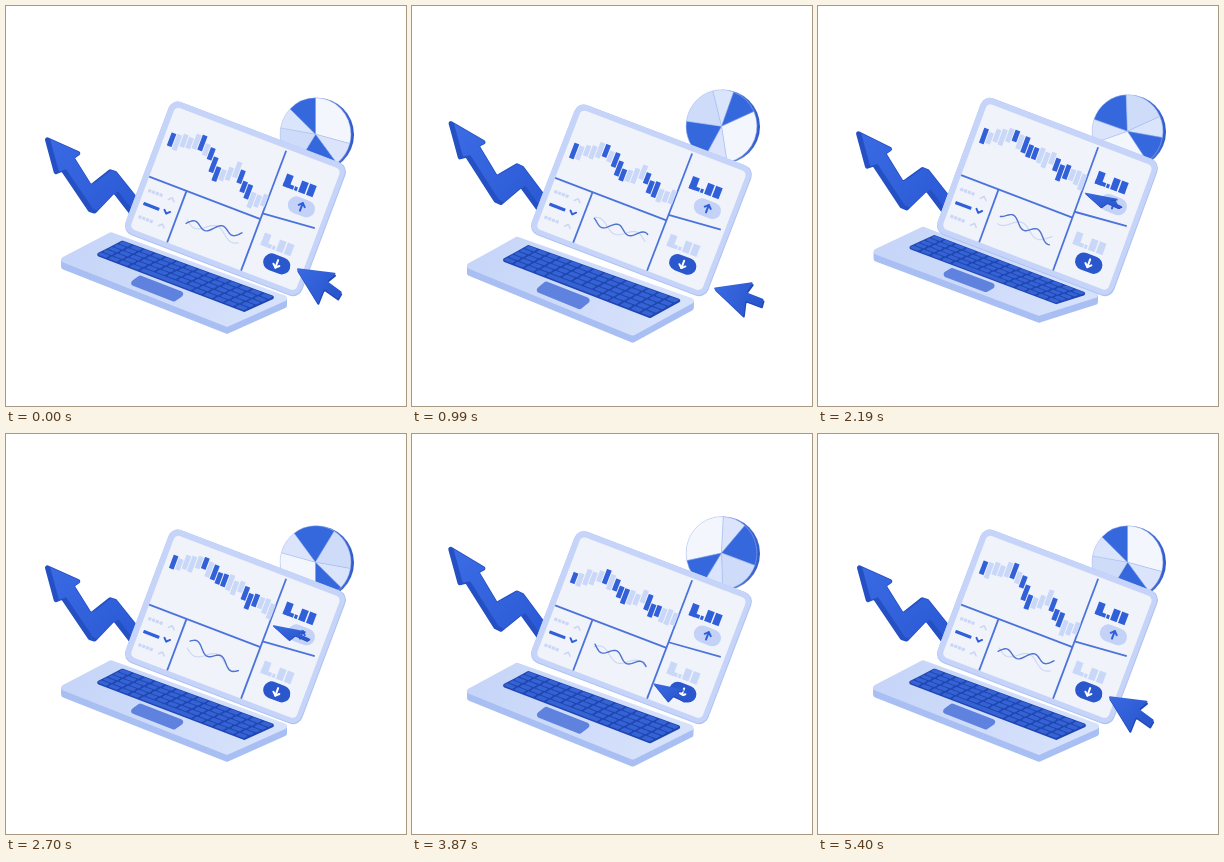
An HTML page with a canvas for the animation above (5.43 s loop, 400 by 400 pixels).

```html
<!DOCTYPE html>
<html lang="en">
<head>
<meta charset="utf-8">
<title>Trading laptop</title>
<style>
html, body { margin: 0; width: 100%; height: 100%; overflow: hidden; background: #fff; }
canvas { display: block; width: 400px; height: 400px; }
</style>
</head>
<body>
<canvas id="stage"></canvas>
<script>
const LOOP = 5430, TURN = 5400, STEP = 30, TAU = Math.PI * 2;
const BLUE = '#2f5fd9', DARK = '#2149b6', PALE = '#c9d7f8', PAPER = '#f1f3fb';
const canvas = document.getElementById('stage');
const ctx = canvas.getContext('2d');
const ratio = window.devicePixelRatio || 1;
canvas.width = canvas.height = 400 * ratio;

const { sin, cos, exp } = Math;
const mix = (a, b, k) => a + (b - a) * k;
const ease = k => k * k * (3 - 2 * k);
const hump = (x, center, width) => exp(-(((x - center) / width) ** 2));
const shift = (pts, dx, dy) => pts.map(([x, y]) => [x + dx, y + dy]);

// Closed polygon with softened corners.
function shape(pts, r = 0) {
  const n = pts.length, last = pts[n - 1];
  ctx.beginPath();
  ctx.moveTo((last[0] + pts[0][0]) / 2, (last[1] + pts[0][1]) / 2);
  pts.forEach((p, i) => {
    const q = pts[(i + 1) % n];
    ctx.arcTo(p[0], p[1], (p[0] + q[0]) / 2, (p[1] + q[1]) / 2, r);
  });
  ctx.closePath();
}

function fillShape(pts, color, r) {
  shape(pts, r);
  ctx.fillStyle = color;
  ctx.fill();
}

function box(x, y, w, h, color, r = 0) {
  ctx.beginPath();
  ctx.roundRect(x, y, w, h, r);
  ctx.fillStyle = color;
  ctx.fill();
}

function line(pts, color, width) {
  ctx.beginPath();
  pts.forEach(p => ctx.lineTo(p[0], p[1]));
  ctx.strokeStyle = color;
  ctx.lineWidth = width;
  ctx.stroke();
}

function fade(x0, y0, x1, y1, from, to) {
  const g = ctx.createLinearGradient(x0, y0, x1, y1);
  g.addColorStop(0, from);
  g.addColorStop(1, to);
  return g;
}

// Pie: each slice runs from its start angle to the next one's.
const SLICES = [
  [0, '#f4f6fe'], [105, '#dbe4fb'], [143, '#3568dd'],
  [212, '#cfdcf9'], [280, '#dae4fb'], [314, '#3568dd']
];

function drawPie(turn, lift) {
  const cy = 123.4 + 4.8 * lift;
  ctx.beginPath();
  ctx.ellipse(311, cy + 0.5, 37, 37, 0, 0, TAU);
  ctx.fillStyle = fade(276, cy, 348, cy, '#b4c7f4', '#2f5acb');
  ctx.fill();
  ctx.save();
  ctx.translate(309.5, cy);
  ctx.scale(35.4, 36.4);
  ctx.rotate(turn - TAU / 4);
  SLICES.forEach(([from, color], i) => {
    const to = i + 1 < SLICES.length ? SLICES[i + 1][0] : 360;
    ctx.beginPath();
    ctx.moveTo(0, 0);
    ctx.arc(0, 0, 1, from / 360 * TAU, to / 360 * TAU);
    ctx.closePath();
    ctx.fillStyle = color;
    ctx.fill();
    ctx.strokeStyle = '#a5bbf0';
    ctx.lineWidth = 0.012;
    ctx.stroke();
  });
  ctx.restore();
}

// Zigzag arrow, lifted most at its tip and held at its tail.
const ARROW = [[39, 131], [75, 147], [68, 152], [85, 179], [104, 164], [110, 166], [131, 192],
  [126, 210], [108, 187], [89, 207], [83, 205], [56, 165], [49, 168]];

function drawArrow(lift) {
  const k = (1 - lift) / 2;
  const pts = ARROW.map(([x, y]) => {
    const reach = (x - 39) / 89;
    return [x - 3 * k * (1 - 1.8 * reach), y - 20 * k * (1 - 0.87 * reach)];
  });
  shape(pts, 1.5);
  ctx.fillStyle = ctx.strokeStyle = '#2450c4';
  ctx.lineWidth = 1.6;
  ctx.lineJoin = 'round';
  ctx.stroke();
  ctx.fill();
  ctx.save();
  ctx.clip();
  fillShape(shift(pts, 4, -2), fade(40, 120, 125, 200, '#3b6ce4', '#2c5ad6'), 1.5);
  ctx.restore();
}

// Laptop base: u runs along the hinge, v toward the front edge.
function drawBase(sway) {
  const at = (u, v) => [
    mix(mix(105, 51, v), mix(286, 221, v), u),
    mix(mix(226 + 6 * sway, 254 + 8.5 * sway, v), mix(292 + 3 * sway, 321 + 12 * sway, v), u)
  ];
  const quad = (u0, v0, u1, v1) => [at(u0, v0), at(u1, v0), at(u1, v1), at(u0, v1)];
  const top = quad(0, 0, 1, 1);
  for (let d = 7; d > 0; d--) fillShape(shift(top, 0, d), '#a9bff3', 3);
  fillShape(top, fade(70, 235, 240, 315, '#c6d5f8', '#d6e1fb'), 3);

  fillShape(quad(0.09, 0.09, 0.95, 0.6), '#1f46b2', 2);
  const rows = 5, cols = 14;
  const u = c => 0.097 + c * 0.0606, v = r => 0.105 + r * 0.097;
  const key = (r, c, span) =>
    fillShape(quad(u(c), v(r), u(c + span) - 0.01, v(r + 1) - 0.02), '#3563d3', 0.8);
  for (let r = 0; r < rows; r++) {
    for (let c = 0; c < cols; c++) {
      const space = r === rows - 1 && c === 4;
      key(r, c, space ? 5 : 1);
      if (space) c += 4;
    }
  }
  fillShape([at(0.37, 0.66), at(0.64, 0.66), at(0.66, 0.92), at(0.39, 0.92)], '#5f82de', 3);
}

// Screen contents
const CANDLE_HUE = '1000010111000111000';

function drawCandles(turn) {
  const left = 43.5 - 7 * cos(2 * turn) + 3 * cos(turn);
  const right = 54 + 7 * cos(turn);
  const n = CANDLE_HUE.length;
  for (let i = 0; i < n; i++) {
    const u = i / (n - 1), x = 13 + i * 6;
    const y = mix(left, right, u) - 14 * hump(u, 0.28, 0.17) - 10 * hump(u, 0.67, 0.08)
      + 7 * cos(turn) * (hump(u, 0.52, 0.08) + hump(u, 0.9, 0.09)) + 1.5 * sin(i * 2.4);
    const h = 14 + 2.5 * sin(i * 1.7 + turn);
    box(x - 2.5, y - h / 2, 5, h, CANDLE_HUE[i] === '1' ? '#3160d8' : PALE, 0.4);
  }
}

function drawWave(curve, color, width) {
  const pts = [];
  for (let u = 0; u <= 1; u += 0.025) pts.push([56 + 57 * u, curve(u)]);
  line(pts, color, width);
}

function drawFigures(y, color) {
  box(133, y, 7, 13, color);
  box(133, y + 9, 11, 4, color);
  box(145, y + 9, 3, 4, color);
  box(149.5, y + 1, 7, 12, color);
  box(158, y + 1, 7, 12, color);
}

function drawPill(x, y, color, ink, dir) {
  box(x - 14, y - 8.5, 28, 17, color, 8.5);
  line([[x, y - 4 * dir], [x, y + 4 * dir]], ink, 2);
  line([[x - 3.2, y + dir], [x, y + 4 * dir], [x + 3.2, y + dir]], ink, 2);
}

function drawList() {
  [94, 108, 122].forEach((y, i) => {
    const on = i === 1, color = on ? BLUE : '#cbd7f5', d = on ? 1.5 : -1.5;
    if (on) box(9, y - 1.6, 17, 3.2, color, 0.6);
    else for (let x = 9; x < 25; x += 4) box(x, y - 1.6, 3.2, 3.2, color, 0.5);
    line([[31, y - d], [34, y + d], [37, y - d]], color, on ? 2 : 1.6);
  });
}

function drawScreen(turn, sway) {
  const b = 4 * sway;
  ctx.save();
  ctx.transform(173 / 185, 66 / 185, -50 / 142, (133 - b) / 142, 167, 93 + b);
  box(-1, 0, 189, 142, '#aec2f3', 10);
  box(-1, 0, 188, 141, '#c5d4f8', 10);
  box(5, 6, 177, 130, PAPER, 5);

  ctx.lineCap = 'butt';
  const dividers = [[5, 81, 124, 81], [124, 8, 124, 136], [124, 75, 178, 70], [45, 81, 45, 136]];
  for (const [x0, y0, x1, y1] of dividers) line([[x0, y0], [x1, y1]], '#4a73dc', 1.8);

  ctx.lineCap = ctx.lineJoin = 'round';
  drawCandles(turn);
  drawList();
  drawWave(u => 108 + 5 * sin(9 * u - 2 * turn), '#cdd8f4', 1.2);
  drawWave(u => 106 - 11 * (u - 0.5) * cos(turn) - 4 * sin(13 * u + 2 * turn), '#4f73cf', 1.4);
  drawFigures(29, BLUE);
  drawPill(158, 55, '#c3d2f6', BLUE, -1);
  drawFigures(92, PALE);
  drawPill(155, 117, '#2a57cc', '#fff', 1);
  ctx.restore();
}

// Pointer poses: x, y, turn in degrees, width scale, height scale
const POINTER = [[0, 0], [41, 5], [31, 13], [46, 24], [42, 31], [28, 21], [22, 36]];
const HOME = [290, 262, 0, 1, 1];
const AWAY = [301, 278, -15, 1, 1];
const UP = [266, 191, 8, 0.87, 0.36];
const DOWN = [241, 247, 8, 0.8, 0.46];
const ROUTE = [
  [0, HOME], [540, AWAY], [1110, AWAY], [1650, UP], [2700, UP],
  [3150, AWAY], [3720, DOWN], [4200, DOWN], [4650, HOME], [TURN, HOME]
];

function drawPointer(t, sway) {
  const i = Math.max(1, ROUTE.findIndex(([time]) => time >= t));
  const [t0, from] = ROUTE[i - 1], [t1, to] = ROUTE[i];
  const k = ease((t - t0) / (t1 - t0));
  const [x, y, deg, sx, sy] = from.map((v, j) => mix(v, to[j], k));
  ctx.save();
  ctx.translate(x, y + 5 * sway);
  ctx.rotate(deg / 360 * TAU);
  ctx.scale(sx, sy);
  fillShape(shift(POINTER, 0.5, 2), DARK, 1);
  fillShape(POINTER, fade(0, 0, 36, 28, '#3a6be2', '#2a57cf'), 1);
  ctx.restore();
}

function draw(t) {
  const turn = t / TURN * TAU;
  const sway = sin(2 * turn), lift = cos(2 * turn);
  ctx.setTransform(ratio, 0, 0, ratio, 0, 0);
  ctx.fillStyle = '#fff';
  ctx.fillRect(0, 0, 400, 400);
  drawPie(turn, lift);
  drawArrow(lift);
  drawBase(sway);
  drawScreen(turn, sway);
  drawPointer(t, sway);
}

const start = performance.now();
function tick() {
  const t = (performance.now() - start) % LOOP;
  draw(Math.floor(t / STEP) * STEP);
  requestAnimationFrame(tick);
}
tick();
</script>
</body>
</html>
```
